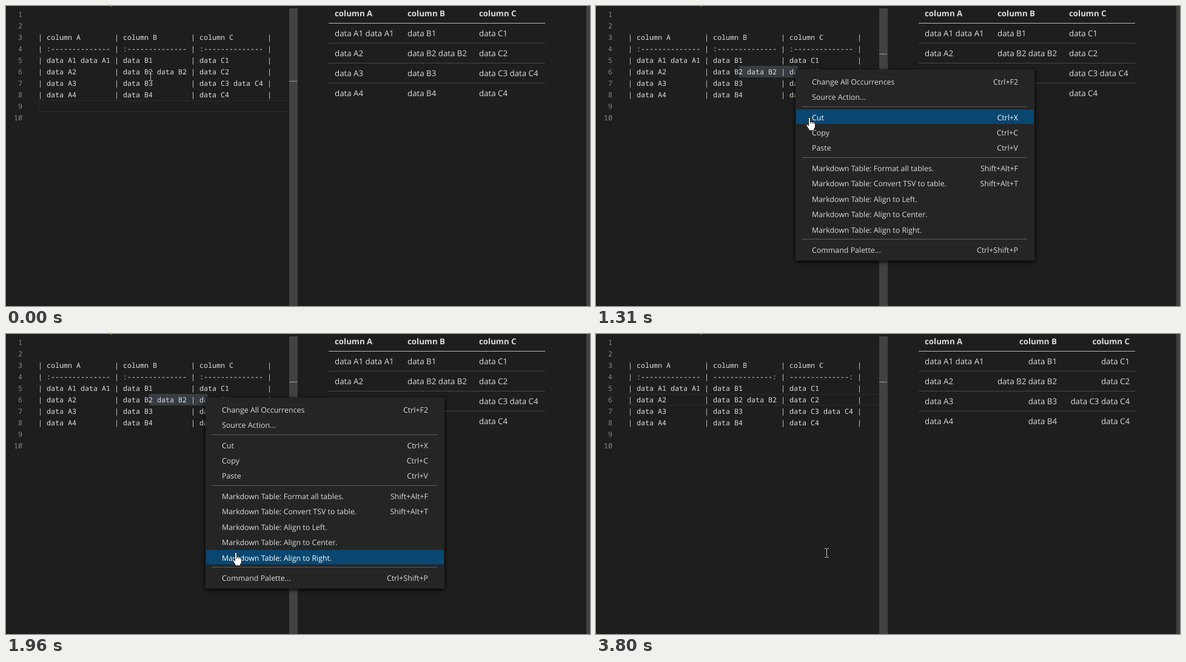
Recreate the animation shown at these times as an HTML page with a canvas. Size 963 by 496 pixels, loop 4050 ms.

```html
<!DOCTYPE html>
<html lang="en">
<head>
<meta charset="utf-8">
<title>Markdown table alignment</title>
<style>
html, body { margin: 0; width: 100%; height: 100%; overflow: hidden; background: #1e1e1e; }
canvas { display: block; }
</style>
</head>
<body>
<canvas id="stage" width="963" height="496"></canvas>
<script>
const ctx = document.getElementById('stage').getContext('2d');
const LOOP = 4050;
const MONO = '11.667px "Noto Sans Mono", monospace';
const SANS = '"Open Sans", "Noto Sans", sans-serif';
const LEFT = 53, CHAR = 7, LINE = 19;

const PRESS = 100, RELEASE = 830, MENU_OPEN = 980, MENU_CLOSE = 2190, APPLIED = 2320, PREVIEWED = 2650;

const table = [
  ['column A', 'column B', 'column C'],
  ['data A1 data A1', 'data B1', 'data C1'],
  ['data A2', 'data B2 data B2', 'data C2'],
  ['data A3', 'data B3', 'data C3 data C4'],
  ['data A4', 'data B4', 'data C4']
];
const dashes = '-'.repeat(14);

// groups: top of the first row, then label and shortcut of each row
const ROW = 25.4;
const menu = [
  [112.5, ['Change All Occurrences', 'Ctrl+F2'], ['Source Action...', '']],
  [171.3, ['Cut', 'Ctrl+X'], ['Copy', 'Ctrl+C'], ['Paste', 'Ctrl+V']],
  [255.6,
    ['Markdown Table: Format all tables.', 'Shift+Alt+F'],
    ['Markdown Table: Convert TSV to table.', 'Shift+Alt+T'],
    ['Markdown Table: Align to Left.', ''],
    ['Markdown Table: Align to Center.', ''],
    ['Markdown Table: Align to Right.', '']],
  [390.7, ['Command Palette...', 'Ctrl+Shift+P']]
];

// pointer path: time, x, y
const path = [
  [0, 238, 116], [100, 237, 109], [150, 238, 108], [570, 330, 104], [700, 331, 104],
  [980, 330, 104], [1080, 332, 112], [1310, 352, 184], [1490, 364, 262], [1620, 369, 306],
  [1790, 375, 340], [1960, 379, 361], [2060, 380, 362]
];

function pointer(t) {
  const i = path.findIndex(p => p[0] > t);
  if (i < 0) return path[path.length - 1].slice(1);
  const [a, b] = [path[i - 1], path[i]];
  const k = (t - a[0]) / (b[0] - a[0]);
  return [1, 2].map(j => Math.round(a[j] + (b[j] - a[j]) * k));
}

const colX = col => LEFT + col * CHAR;

function rect(x, y, w, h, color) {
  ctx.fillStyle = color;
  ctx.fillRect(x, y, w, h);
}

function text(s, x, y, color, font, align = 'left') {
  ctx.font = font;
  ctx.fillStyle = color;
  ctx.textAlign = align;
  ctx.fillText(s, x, y);
}

function codeLine(n, s) {
  for (const m of s.matchAll(/\S+/g))
    text(m[0], colX(m.index), n * LINE - 1, m[0] === '|' ? '#d4e0cc' : '#e0e0e0', MONO);
}

function markSpan(from, to, color) {
  ctx.fillStyle = color;
  ctx.beginPath();
  ctx.roundRect(colX(from), 99, (to - from) * CHAR, LINE, 3);
  ctx.fill();
}

function currentLine(n) {
  ctx.strokeStyle = '#2c2c2c';
  ctx.lineWidth = 1;
  ctx.strokeRect(53.5, n * LINE - 14.5, 427, 18);
}

function editor(t) {
  // the selection trails the pointer a little
  const end = Math.min(40, Math.max(26, Math.round((pointer(Math.max(0, t - 40))[0] - LEFT) / CHAR)));
  const pressed = t >= PRESS, applied = t >= APPLIED;
  const menuOpen = t >= MENU_OPEN && t < MENU_CLOSE;

  if (!pressed) currentLine(9);
  else if (applied || end === 26) currentLine(6);
  else {
    if (end === 27) [8, 34, 44].forEach(c => markSpan(c, c + 1, '#2d3c4b'));
    markSpan(26, end, menuOpen ? '#373d43' : '#264f78');
  }

  for (let n = 1; n <= 10; n++) text(n, 27, n * LINE - 1, '#8a8a8a', MONO, 'right');
  const row = cells => '| ' + cells.map(c => c.padEnd(15)).join(' | ') + ' |';
  const right = applied ? dashes + ':' : ':' + dashes;
  const lines = table.map(row);
  lines.splice(1, 0, row([':' + dashes, right, right]));
  lines.forEach((s, i) => codeLine(i + 3, s));

  rect(172, 0, 3, 1, '#8c8a18');
  rect(467, 4, 14, 492, '#424242');
  rect(467, pressed ? 79 : 124, 13, 1, '#a0a0a0');

  if (applied) {
    if (t < 2830 || (t >= 3310 && t < 3800)) rect(192, 99, 2, LINE, '#aeafad');
  } else if (pressed && !menuOpen) rect(colX(end) - 1, 99, 2, LINE, '#aeafad');
}

function preview(t) {
  const lefts = [542, 662, 780], rights = [0, 760, 880];
  table.forEach((cells, r) => {
    const font = (r ? '13.3px ' : 'bold 13.3px ') + SANS;
    cells.forEach((s, c) => {
      const flip = c && t >= PREVIEWED;
      text(s, flip ? rights[c] : lefts[c], 17 + r * 33, '#dcdcdc', font, flip ? 'right' : 'left');
    });
    if (r < 4) rect(532, 28 + r * 33, 357, 1, r ? '#474747' : '#b9b9b9');
  });
  rect(957, 0, 6, 496, '#424242');
}

function contextMenu(y) {
  ctx.save();
  ctx.shadowColor = '#000';
  ctx.shadowBlur = 7;
  ctx.shadowOffsetY = 2;
  rect(329, 105, 394, 316, '#252526');
  ctx.restore();
  for (const sep of [166, 250, 385]) rect(340, sep, 371, 1, '#606060');
  const font = '12.4px ' + SANS;
  for (const [first, ...rows] of menu) rows.forEach(([label, keys], i) => {
    const top = first + i * ROW, base = Math.round(top + 17.3);
    const hot = y >= top && y < top + ROW;
    if (hot) rect(330, Math.floor(top), 392, 24, '#094771');
    const color = hot ? '#fff' : '#dcdcdc';
    text(label, 356, base, color, font);
    text(keys, 696, base, color, font, 'right');
  });
}

function clickSpot(x, y) {
  ctx.fillStyle = 'rgba(200,190,0,.7)';
  ctx.beginPath();
  ctx.arc(x - 1, y, 12, 0, 7);
  ctx.fill();
}

function stroke(shape, color, width) {
  ctx.strokeStyle = color;
  ctx.lineWidth = width;
  ctx.stroke(shape);
}

const beam = new Path2D('M-3-7.5H-1L.5-6.5L2-7.5H4M.5-6.5V6.5M-3 7.5H-1L.5 6.5L2 7.5H4');
const hand = new Path2D('M-1.5 1Q0-1 1.5 1V8Q3 6.5 4.5 8Q6 7 7.3 8.7Q9 8 9.5 10V15' +
  'Q9.5 18 7.5 20V22H-1V20L-5 14Q-6 11.5-3.7 11.7L-1.5 14Z');
const knuckles = new Path2D('M1.5 8V11M4.5 8.5V11M7.3 9V11.5');

function cursor(x, y, isHand) {
  ctx.save();
  ctx.translate(x, y);
  if (isHand) {
    ctx.fillStyle = '#fff';
    ctx.fill(hand);
    stroke(hand, '#111', 1);
    stroke(knuckles, '#111', .8);
  } else {
    stroke(beam, '#000', 2.4);
    stroke(beam, '#e8e8e8', 1);
  }
  ctx.restore();
}

function draw(t) {
  const [x, y] = pointer(t);
  const menuOpen = t >= MENU_OPEN && t < MENU_CLOSE;
  rect(0, 0, 963, 496, '#1e1e1e');
  editor(t);
  preview(t);
  if (menuOpen) contextMenu(y);
  if ((t >= PRESS && t < RELEASE) || (t >= MENU_OPEN && t < MENU_OPEN + 80)) clickSpot(x, y);
  cursor(x, y, menuOpen && y > 106);
}

ctx.textRendering = 'geometricPrecision';
const start = performance.now();
function tick() {
  draw((performance.now() - start) % LOOP);
  requestAnimationFrame(tick);
}
tick();
</script>
</body>
</html>
```
